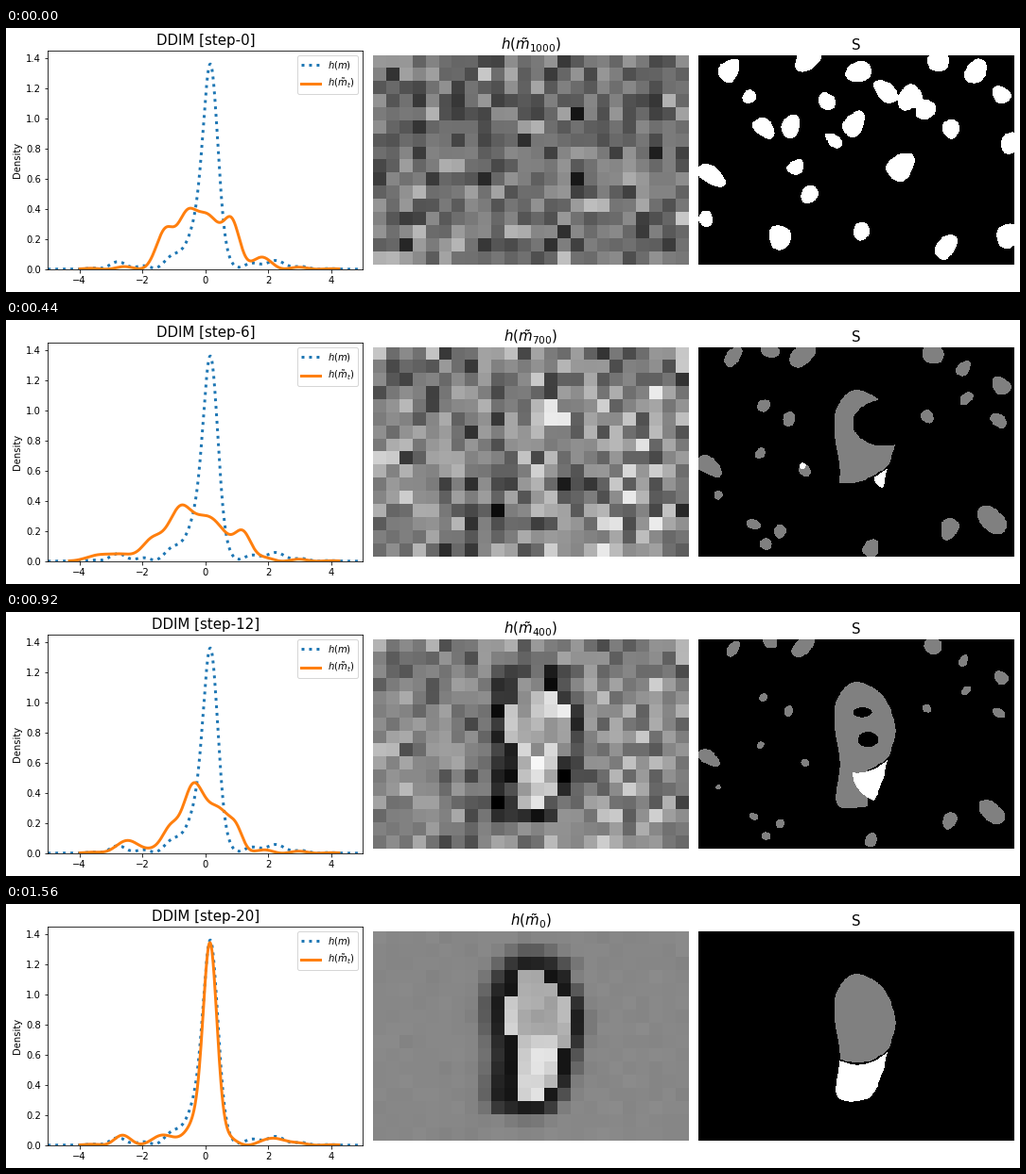
A matplotlib script for the animation above (1960 ms loop, 1072 by 280 pixels).

```python
import numpy as np
import matplotlib.pyplot as plt
from matplotlib.animation import FuncAnimation
from matplotlib.path import Path

W, H = 1072, 280
COLS, ROWS = 24, 16
LAST = 20
X0, Y0, PX = 732, 29, 333.4 / 384   # corner and pixel size of the S panel

rng = np.random.default_rng(7)


# --- densities -----------------------------------------------------------
x = np.linspace(-5, 5, 600)


def bumps(*parts, freq=5.6):
    """Sum of (centre, height, width) bells over a faint rippled tail."""
    tail = .012 * (1 + np.cos(freq * x + 2)) * np.exp(-(x / 3.4) ** 4)
    return tail + sum(h * np.exp(-((x - c) / s) ** 2 / 2) for c, h, s in parts)


truth = bumps((.17, 1.1, .22), (-.1, .32, .42), (-1, .05, .3),
              (-2.75, .035, .3), (2.1, .04, .5), freq=7.4)
curves = {
    0: bumps((-1.25, .24, .28), (-.62, .28, .28), (.08, .35, .4),
             (.85, .26, .25), (1.75, .06, .3)),
    1: bumps((-3.2, .04, .4), (-1.8, .15, .28), (-.8, .33, .46),
             (.2, .26, .38), (1.2, .18, .28)),
    8: bumps((-3.1, .05, .5), (-1.65, .12, .4), (-.82, .31, .32),
             (.1, .29, .5), (1.2, .18, .25)),
    12: bumps((-2.4, .07, .4), (-1.1, .15, .25), (-.42, .38, .32),
              (.35, .29, .42), (1, .09, .2)),
    16: bumps((-2.7, .03, .4), (-1.1, .1, .3), (-.1, .59, .36),
              (.45, .32, .28), (1.9, .04, .4)),
    20: bumps((.15, 1.14, .21), (0, .22, .4), (-1.2, .05, .4),
              (-2.65, .05, .25), (2.3, .04, .3)),
}


def density(k):
    if k in curves:
        return curves[k]
    a = max(s for s in curves if s < k)
    b = min(s for s in curves if s > k)
    f = (k - a) / (b - a)
    return (1 - f) * curves[a] + f * curves[b]


# --- segmentation, worked out in stage pixels ----------------------------
gx, gy = np.meshgrid(X0 + PX * (np.arange(384) + .5),
                     Y0 + PX * (np.arange(256) + .5))
# a gentle warp makes round balls uneven
wx = gx + 2.5 * np.sin(.13 * gy + 1) + 2 * np.sin(.07 * gx + .05 * gy)
wy = gy + 2.5 * np.sin(.11 * gx + 2) + 2 * np.sin(.06 * gy - .08 * gx)

# x, y, radius
start_balls = [
    (764, 43, 12), (845, 34, 13), (785, 73, 7), (867, 77, 9), (801, 107, 11),
    (832, 104, 11), (837, 146, 8), (846, 178, 10), (896, 103, 12),
    (872, 119, 8), (903, 48, 12), (928, 66, 12), (955, 74, 12), (972, 90, 9),
    (985, 34, 12), (1025, 50, 12), (1052, 71, 9), (1000, 107, 10),
    (1058, 120, 11), (946, 148, 14), (746, 158, 12), (815, 220, 13),
    (901, 217, 9), (740, 205, 8), (992, 230, 12), (1057, 218, 12)]
balls = [
    (767, 37, 10), (807, 33, 11), (840, 37, 13), (800, 92, 7), (830, 104, 8),
    (799, 146, 7), (744, 157, 12), (752, 188, 6), (788, 219, 7),
    (815, 221, 8), (803, 240, 8), (843, 160, 7), (980, 36, 13),
    (1012, 52, 8), (1013, 84, 8), (1052, 70, 10), (1050, 104, 8),
    (974, 104, 7), (994, 220, 11), (1042, 210, 15), (917, 243, 10)]


def metaballs(items, shrink=0):
    field = np.zeros_like(gx)
    for cx, cy, r in items:
        d2 = (wx - cx) ** 2 + (wy - cy) ** 2
        field += max(r - shrink, 0) ** 4 / (d2 ** 2 + 1)
    return field > 1


def oval(cx, cy, rx, ry=None):
    ry = ry or rx
    return ((gx - cx) / rx) ** 2 + ((gy - cy) / ry) ** 2 < 1


def closed_curve(pts, sub=10):
    """Closed Catmull-Rom curve through a few points."""
    b = np.array(pts, float)[:, None]
    a, c, d = (np.roll(b, n, axis=0) for n in (1, -1, -2))
    t = np.linspace(0, 1, sub, endpoint=False)[None, :, None]
    q = .5 * (2 * b + (c - a) * t + (2 * a - 5 * b + 4 * c - d) * t**2
              + (3 * b - a - 3 * c + d) * t**3)
    return q.reshape(-1, 2)


foot_line = closed_curve([
    (901, 75), (927, 90), (940, 125), (931, 160), (927, 177), (912, 206),
    (879, 205), (881, 160), (875, 110), (884, 84)])
foot = Path(foot_line).contains_points(
    np.column_stack([gx.ravel(), gy.ravel()])).reshape(gx.shape)
seam = 170 - .0135 * (gx - 900) ** 2


def segments(k):
    """0 black, 1 grey, 2 white."""
    if k == 0:
        return 2 * metaballs(start_balls)
    fade = 5 * (k / 16) ** 2 + 4 * max(k - 16, 0)
    img = metaballs(balls, fade).astype(int)

    # the upper part spreads from one spot, with a notch that closes
    reach = np.interp(k, [1, 4, 8], [20, 25, 96])
    grey = foot & (oval(888, 113, reach) | oval(931, 157, 14, 23))
    close = np.clip((k - 8) / 4, 0, 1)
    size = np.clip((15 - k) / 3, 0, 1)
    if size > 0:
        grey &= ~oval(928 - 23 * close, 110 - 3 * close,
                      (33 - 23 * close) * size, (24 - 19 * close) * size)
    hole = 1 - abs(k - 12) / 3
    if hole > 0:
        grey &= ~oval(911, 136, 11 * hole, 8 * hole)
    grey &= (gy < seam - 1) | ((gx < 911) & (4 < k < 16))

    # the lower part spreads from its right end
    grow = np.interp(k, [3, 8, 12, 16], [2, 16, 34, 75])
    white = foot & (gy > seam + 1) & oval(928, 168, grow)
    img[grey] = 1
    img[white] = 2
    if k < 9:
        img[oval(842, 155, 3.5)] = 2
    return img


# --- cell image ----------------------------------------------------------
def clean_cells():
    """Bright foot with a dark ring that fades with distance."""
    cell = PX * 16
    c, r = np.meshgrid(np.arange(COLS), np.arange(ROWS))
    mid = np.column_stack([X0 + cell * (c.ravel() + .5),
                           Y0 + cell * (r.ravel() + .5)])
    gap = mid[:, None] - foot_line[None]
    d = np.hypot(gap[..., 0], gap[..., 1])
    near = gap[np.arange(len(mid)), d.argmin(1)]
    reach = np.where(near.sum(1) < 0, 26, 17)
    ring = .53 - .45 * np.exp(-(d.min(1) / reach) ** 3)
    ring = ring.reshape(ROWS, COLS)
    inside = Path(foot_line).contains_points(mid).reshape(ROWS, COLS)
    fill = np.where((r > 9) | (c == 10), .82, .67)
    fill = fill + .3 * np.exp(-((c - 12.5) / 2) ** 2 - ((r - 8.8) / .7) ** 2)
    fill += rng.normal(0, .04, fill.shape)
    return np.where(inside, fill, ring)


clean = clean_cells()
start_noise = rng.normal(.45, .13, (ROWS, COLS))
noise = rng.normal(0, 1, (ROWS, COLS))


def cells(k):
    if k == 0:
        return start_noise
    t = min(k / 15, 1)
    form = t * t * (3 - 2 * t)
    amp = .006 + .165 * (1 - (k / LAST) ** 2)
    return .53 + form * (clean - .53) + amp * noise


# --- stage ---------------------------------------------------------------
fig, (ax, ax_img, ax_seg) = plt.subplots(1, 3, figsize=(W / 72, H / 72),
                                         dpi=72, facecolor='white')

ax.plot(x, truth, ':', color='#1f77b4', lw=3, label='$h(m)$')
curve, = ax.plot([], [], color='#ff7f0e', lw=3, label=r'$h(\tilde{m}_t)$')
ax.set(xlim=(-5, 5), ylim=(0, 1.45), ylabel='Density')
ax.legend(loc='upper right')
title = ax.set_title('DDIM [step-0]', fontsize=15)

picture = ax_img.imshow(clean, cmap='gray', vmin=0, vmax=1)
img_title = ax_img.set_title(r'$h(\tilde{m}_{1000})$', fontsize=15)
mask = ax_seg.imshow(segments(0), cmap='gray', vmin=0, vmax=2,
                     interpolation='nearest')
ax_seg.set_title('S', fontsize=15)
for a in (ax_img, ax_seg):
    a.axis('off')
fig.tight_layout(pad=.72, w_pad=1.08, rect=(0, 0, 1 + .8 / W, 1 + .8 / H))


def draw(i):
    k = min((i + 1) // 2, LAST)
    title.set_text(f'DDIM [step-{k}]')
    img_title.set_text(rf'$h(\tilde{{m}}_{{{1000 - 50 * k}}})$')
    y = density(k)
    seen = np.flatnonzero(y > .002)
    part = slice(seen[0], seen[-1] + 1)
    curve.set_data(x[part], y[part])
    picture.set_data(cells(k))
    mask.set_data(segments(k))
    return []


anim = FuncAnimation(fig, draw, frames=49, interval=40, repeat=True,
                     repeat_delay=0, blit=False)
plt.show()
```
